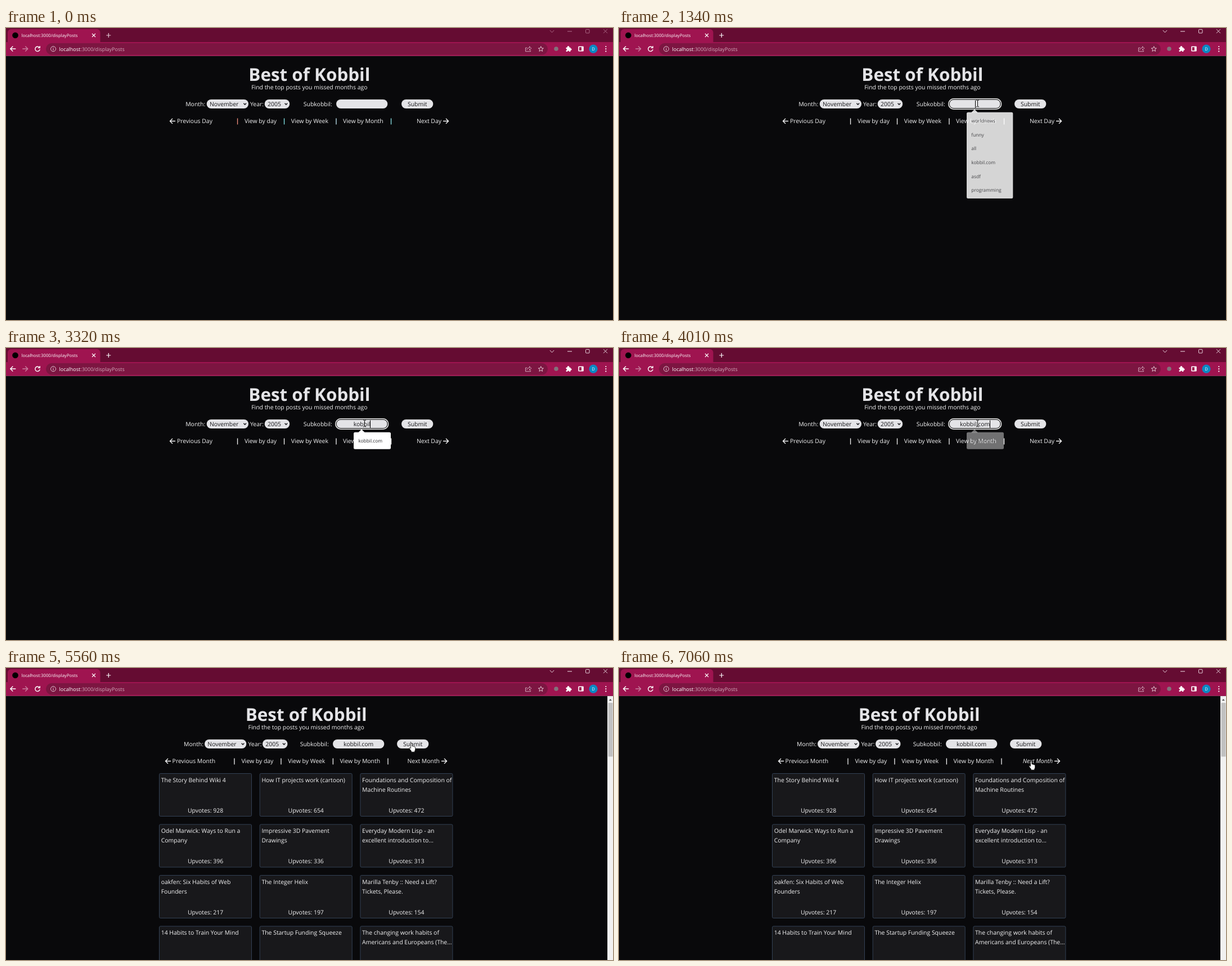
Write an HTML page with a canvas that moves like this. It is 1079 by 519 pixels and loops after 8 s.

```html
<!DOCTYPE html>
<html lang="en">
<head>
<meta charset="utf-8">
<title>Best of Kobbil</title>
<style>
html, body { margin: 0; width: 100%; height: 100%; overflow: hidden; background: #09090b; }
canvas { display: block; }
</style>
</head>
<body>
<canvas id="stage" width="1079" height="519"></canvas>
<script>
const ctx = document.getElementById('stage').getContext('2d');
ctx.textRendering = 'geometricPrecision';
const LOOP = 8000, FOCUS = 1190, POPUP = 1250, FILTER = 2720, CLOSE = 3890, CLICK = 5410, RESULTS = 5560;
const WORD = 'kobbil.com';
const KEYS = [2620, 2720, 2930, 3090, 3200, 3320, 3450, 3610, 3760, 3870];
const SUGGESTIONS = ['worldnews', 'funny', 'all', WORD, 'asdf', 'programming'];
const BODY = 10.45, LIGHT = '#e4e4e7', INK = '#18181b', TEXT = '#f4f4f5', BAR = '#9f1450';

// time, x, y of the pointer tip
const PATH = [
  [600, 735, 512], [900, 696, 171], [1140, 637, 134], [4750, 637, 134],
  [4870, 704, 141], [4960, 714, 143], [5110, 721, 134], [6910, 721, 134], [7060, 733, 166]
];

const POSTS = [
  ['The Story Behind Wiki 4', '', 928],
  ['How IT projects work (cartoon)', '', 654],
  ['Foundations and Composition of', 'Machine Routines', 472],
  ['Odel Marwick: Ways to Run a', 'Company', 396],
  ['Impressive 3D Pavement', 'Drawings', 336],
  ['Everyday Modern Lisp - an', 'excellent introduction to...', 313],
  ['oakfen: Six Habits of Web', 'Founders', 217],
  ['The Integer Helix', '', 197],
  ['Marilla Tenby :: Need a Lift?', 'Tickets, Please.', 154],
  ['14 Habits to Train Your Mind', '', 149],
  ['The Startup Funding Squeeze', '', 141],
  ['The changing work habits of', 'Americans and Europeans (The...', 138]
];

const clamp01 = v => Math.max(0, Math.min(1, v));

function text(str, x, y, { size = BODY, color = TEXT, align = 'left', style = '' } = {}) {
  ctx.font = `${style} ${size}px "Open Sans", "Noto Sans", sans-serif`;
  ctx.fillStyle = color;
  ctx.textAlign = align;
  ctx.fillText(str, x, y);
}

function box(x, y, w, h, r, fill, stroke, width = 1) {
  ctx.beginPath();
  ctx.roundRect(x, y, w, h, r);
  if (fill) { ctx.fillStyle = fill; ctx.fill(); }
  if (stroke) { ctx.strokeStyle = stroke; ctx.lineWidth = width; ctx.stroke(); }
}

function disc(x, y, r, fill) {
  ctx.beginPath();
  ctx.arc(x, y, r, 0, Math.PI * 2);
  ctx.fillStyle = fill;
  ctx.fill();
}

// Strokes an SVG path placed at x, y
function line(d, x, y, color, width = 1.2) {
  ctx.save();
  ctx.translate(x, y);
  ctx.strokeStyle = color;
  ctx.lineWidth = width;
  ctx.stroke(new Path2D(d));
  ctx.restore();
}

function shape(d, x, y, fill, stroke) {
  ctx.save();
  ctx.translate(x, y);
  const p = new Path2D(d);
  ctx.fillStyle = fill;
  ctx.fill(p);
  if (stroke) { ctx.strokeStyle = stroke; ctx.lineWidth = 0.8; ctx.stroke(p); }
  ctx.restore();
}

const LEFT = 'M5 0H-4.5M0 -4.5L-4.5 0L0 4.5', RIGHT = 'M-5 0H4.5M0 -4.5L4.5 0L0 4.5';
const CROSS = 'M-3 -3L3 3M3 -3L-3 3';

function browser(active) {
  ctx.fillStyle = '#650c32';
  ctx.fillRect(0, 0, 1079, 26);
  box(3, 2, 164.5, 30, 6, BAR);
  ctx.fillStyle = BAR;
  ctx.fillRect(0, 25, 1079, 25);
  ctx.fillStyle = '#8c2f58';
  ctx.fillRect(0, 49, 1079, 1);

  disc(16.5, 13, 5.3, '#000');
  text('localhost:3000/displayPosts', 27.5, 16, { size: 7.75, color: '#fff' });
  line(CROSS, 156, 13, '#fff', 1.1);
  line('M-4 0H4M0 -4V4', 182.3, 13, active ? '#fff' : '#e6ccd8', 1.2);

  const ui = active ? '#f3e6ec' : '#b0708c';
  line('M-3.7 -2L0 2L3.7 -2', 970.5, 6, ui, 0.9);
  line('M-4 0H4', 1002, 6, ui, 1);
  box(1030.5, 2.5, 6.5, 6.5, 1, null, ui, 0.9);
  line('M-3.5 -3.5L3.5 3.5M3.5 -3.5L-3.5 3.5', 1065.5, 5.7, ui, 0.9);

  line(LEFT, 12.3, 37, '#fff', 1.4);
  line(RIGHT, 34.3, 37, '#c9819f', 1.3);
  line('M3.2 -2.6A4.2 4.2 0 1 0 4.2 1M4.2 -5V-1.6H.8', 56, 37, '#fff', 1.4);

  box(71, 27, 892, 20.5, 10.2, '#7c1541');
  ctx.beginPath();
  ctx.arc(84, 37.2, 4.5, 0, 7);
  ctx.strokeStyle = '#e3c5d2';
  ctx.lineWidth = 1;
  ctx.stroke();
  line('M0 -.6V2.6M0 -2.5V-1.4', 84, 37.2, '#e3c5d2', 1.1);
  text('localhost', 94.5, 40.5, { size: 9.03, color: '#fff' });
  const hostWidth = ctx.measureText('localhost').width;
  text(':3000/displayPosts', 94.5 + hostWidth, 40.5, { size: 9.03, color: '#d3a9bb' });

  line('M-2 -2H-5V4.5H4V2.5M-3 2C-2 -1 0 -2 2 -2V-4.5L5.3 -1L2 2.3V0', 928.5, 37.2, '#d9b3c4', 0.9);
  line('M0 -4.6L1.3 -1.4L4.6 -1.2L2 .9L2.9 4.2L0 2.4L-2.9 4.2L-2 .9L-4.6 -1.2L-1.3 -1.4Z', 950.8, 37.2, '#e3c5d2', 1);
  disc(978, 37, 3.8, '#83737c');
  box(995.5, 34.5, 8, 7.5, 1, '#fff');
  disc(999.5, 34, 1.9, '#fff');
  disc(1003.8, 38, 1.8, '#fff');
  disc(995.6, 38.5, 1.4, BAR);
  disc(999.5, 41.8, 1.4, BAR);
  box(1018, 33.2, 8, 7.6, 0.6, null, '#fff', 1.6);
  ctx.fillStyle = '#fff';
  ctx.fillRect(1023, 33, 3, 8);
  disc(1044, 37.2, 7.6, '#0b88c4');
  text('D', 1044, 40, { size: 7.6, color: '#fff', align: 'center' });
  for (const y of [33, 37.2, 41.4]) disc(1066.3, y, 1.1, '#fff');
}

function select(label, x, w) {
  box(x, 127, w, 16, 8, LIGHT);
  text(label, x + 5.3, 139, { color: INK });
  line('M-2.3 -1.2L0 1.2L2.3 -1.2', x + w - 6.3, 135, INK, 1.5);
}

function form(t, done) {
  // x positions: month, select, year, select, label, input, button
  const [mx, ms, yx, ys, sx, ix, bx] = done
    ? [316, 353, 430.5, 456, 522.7, 581, 695]
    : [319.2, 356.7, 434, 459.7, 528.8, 587, 703];
  text('Month:', mx, 139);
  select('November', ms, 74.3);
  text('Year:', yx, 139);
  select('2005', ys, 44.5);
  text('Subkobbil:', sx, 139);

  const focused = t >= FOCUS && t < CLICK;
  if (focused) box(ix - 1.2, 125.8, 93.8, 18.4, 9.2, '#09090b', '#fff', 1.5);
  box(ix, 127, 91.3, 16, 8, LIGHT);
  if (focused) box(ix + 0.2, 127.2, 90.9, 15.6, 7.8, null, '#111', 0.9);
  const typed = WORD.slice(0, KEYS.filter(k => k <= t).length);
  const cx = ix + 45.6;
  text(typed, cx, 139, { color: INK, align: 'center' });
  const half = ctx.measureText(typed).width / 2;
  const lastKey = KEYS.filter(k => k <= t).pop() || 1320;
  if (focused && Math.floor((t - lastKey) / 530) % 2 === 0) {
    ctx.fillStyle = '#000';
    ctx.fillRect(Math.round(cx + half), 128.5, 1, 13.5);
  }

  box(bx, 127, 56.3, 16, 8, LIGHT);
  text('Submit', bx + 28.2, 139, { color: INK, align: 'center' });
}

function nav(done, active, hover) {
  const y = 169.3, shift = hover ? 1 : 0;
  const unit = done ? 'Month' : 'Day';
  const x0 = done ? 288 : 296;
  line(LEFT, x0, 165.5, TEXT, 1.4);
  text('Previous ' + unit, done ? 295.6 : 304, y);
  const base = done ? 406 + shift : 411.6;
  const tints = ['#f58f80', '#83e6ea', '#c4e8f4', '#8ce4ea'];
  [0, 83, 175.4, 273].forEach((dx, i) => {
    ctx.fillStyle = active ? TEXT : tints[i];
    ctx.fillRect(base + dx - 0.7, 160.5, 1.3, 11);
  });
  text('View by day', base + 12.4, y);
  text('View by Week', base + 95.2, y);
  text('View by Month', base + 187.4, y);
  const end = done ? 779 : 782;
  text('Next ' + unit, end - 8, y, { align: 'right', style: hover ? 'italic' : '' });
  line(RIGHT, end, 165.5, TEXT, 1.4);
}

function cards() {
  POSTS.forEach(([a, b, votes], i) => {
    const x = 272.5 + (i % 3) * 178.7, y = 187.5 + Math.floor(i / 3) * 90.5;
    box(x, y, 164, 76, 2, INK, '#334155', 1);
    text(a, x + 3.2, y + 15.3);
    text(b, x + 3.2, y + 32);
    text('Upvotes: ' + votes, x + 82, y + 69, { align: 'center' });
  });
}

function scrollbar() {
  ctx.fillStyle = '#f1f1f1';
  ctx.fillRect(1069, 50, 10, 469);
  ctx.fillStyle = '#c1c1c1';
  ctx.fillRect(1070.5, 62, 8, 95.5);
  shape('M-2.5 1.5L0 -1.5L2.5 1.5Z', 1074.3, 56.5, '#505050');
}

function popup(t) {
  const alpha = clamp01((t - POPUP) / 110) * (1 - clamp01((t - CLOSE) / 210));
  if (!alpha) return;
  ctx.globalAlpha = alpha;
  const short = t >= FILTER;
  const items = short ? [WORD] : SUGGESTIONS;
  box(618, 149.8, short ? 66 : 82.3, 5.2 + items.length * 24.67, 2.5, '#fff');
  shape('M-6 5.5L0 -.5L6 5.5Z', 632, 145, '#fff');
  items.forEach((s, i) => text(s, 626.3, 168 + i * 24.67, { size: 8.4, color: '#27272a' }));
  ctx.globalAlpha = 1;
}

function pointerAt(t) {
  if (t < PATH[0][0]) return null;
  for (let i = 1; i < PATH.length; i++) {
    const [t0, x0, y0] = PATH[i - 1], [t1, x1, y1] = PATH[i];
    if (t < t1) {
      const k = (t - t0) / (t1 - t0);
      return [x0 + (x1 - x0) * k, y0 + (y1 - y0) * k];
    }
  }
  return PATH[PATH.length - 1].slice(1);
}

const inside = ([x, y], x0, y0, x1, y1) => x > x0 && x < x1 && y > y0 && y < y1;

function pointer(p, done, hover) {
  const [x, y] = p;
  if (!done && inside(p, 587, 127, 678, 143)) {
    line('M-2.5 -6Q0 -6 0 -4.5Q0 -6 2.5 -6M0 -5V5M-2.5 6Q0 6 0 4.5Q0 6 2.5 6', x + 0.5, y, '#111', 1);
  } else if (hover || inside(p, done ? 695 : 706, 127, 757, 143)) {
    shape('M-1.2 .2Q0 -1 1.2 .2V5Q2.6 4.3 3.3 5.5Q4.6 4.9 5.2 6.1Q6.8 5.7 6.9 7.3V10.5Q6.8 12.5 5.8 13.5V15.2H-.2V13.8L-3.6 9.2Q-4.2 7.4 -2.6 7.6L-1.2 9Z',
      x - 0.3, y, '#fff', '#111');
  } else {
    shape('M0 0V11L2.5 8.8L4.2 12.5L6 11.7L4.3 8.1H7.7Z', x, y, '#fff', '#111');
  }
}

function draw(t) {
  const done = t >= RESULTS, active = t >= FOCUS;
  const p = pointerAt(t);
  const hover = done && inside(p, 713, 157, 784, 173);
  ctx.fillStyle = '#09090b';
  ctx.fillRect(0, 0, 1079, 519);
  browser(active);
  const cx = done ? 533.7 : 539.3;
  text('Best of Kobbil', cx, 94, { size: 31.4, color: LIGHT, align: 'center', style: 'bold' });
  text('Find the top posts you missed months ago', cx, 109, { align: 'center' });
  form(t, done);
  nav(done, active, hover);
  if (done) {
    cards();
    scrollbar();
  }
  popup(t);
  if (p) pointer(p, done, hover);
}

const start = performance.now();
function tick() {
  draw((performance.now() - start) % LOOP);
  requestAnimationFrame(tick);
}
tick();
</script>
</body>
</html>
```
